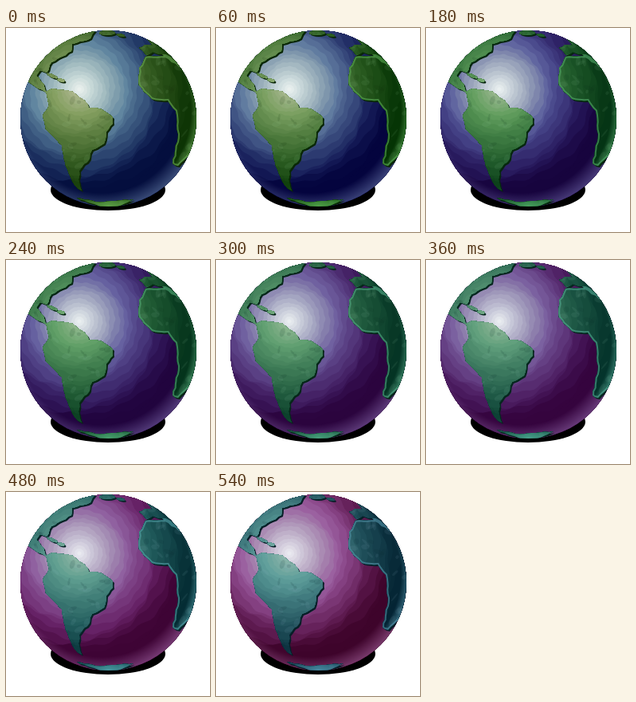
Recreate the animation shown at these times as an HTML page with a canvas. Size 256x256 px, loop 0.6 s.

```html
<!DOCTYPE html>
<html lang="en">
<head>
<meta charset="utf-8">
<title>Colour-shifting globe</title>
<style>
html, body { margin: 0; width: 100%; height: 100%; overflow: hidden; background: #fff; }
canvas { display: block; }
</style>
</head>
<body>
<canvas width="256" height="256"></canvas>
<script>
const ctx = document.querySelector('canvas').getContext('2d');
const STEP_MS = 60, STEPS = 10, HUE_STEP = 10;
const LIGHT = { x: 92, y: 77 };
const TAU = Math.PI * 2;

let seed = 7;
const random = () => (seed = seed * 16807 % 2147483647) / 2147483647;
const jitter = amount => (random() - 0.5) * amount;

const globe = new Path2D();
globe.arc(128.5, 113.5, 110.5, 0, TAU);

// Closed outline through a few key points, roughened in between
function coast(text) {
  const points = text.split(' ').map(p => p.split(',').map(Number));
  const path = new Path2D();
  points.forEach(([x, y], i) => {
    const [nx, ny] = points[(i + 1) % points.length];
    const parts = Math.max(1, Math.round(Math.hypot(nx - x, ny - y) / 5));
    for (let k = 0; k < parts; k++) {
      const rough = k ? 1.8 : 0;
      path.lineTo(x + (nx - x) * k / parts + jitter(rough), y + (ny - y) * k / parts + jitter(rough));
    }
  });
  path.closePath();
  return path;
}

function island(x, y, rx, ry, turn) {
  const path = new Path2D();
  path.ellipse(x, y, rx, ry, turn, 0, TAU);
  return path;
}

const africa = coast('175,36 200,35 218,47 245,60 245,145 216,173 209,170 216,133 213,104 203,91 183,89 167,72 167,50');
const southAmerica = coast('50,80 58,76 84,80 102,95 104,100 120,102 134,112 134,120 126,130 123,145 108,153 105,164 92,179 91,190 95,204 86,197 75,173 70,147 50,127 46,110 54,96');
const northAmerica = coast('112,3 106,13 83,20 82,29 57,43 51,56 43,53 38,60 47,70 50,81 36,73 20,62 40,20 90,0');
const europe = coast('167,25 174,21 184,22 174,11 190,10 220,44 212,45 196,33 184,30 176,34');
const antarctica = coast('89,213 112,218 138,217 160,215 130,229');

const land = new Path2D();
for (const part of [africa, southAmerica, northAmerica, europe, antarctica,
  island(58, 60, 7, 1.8, 0.4), island(69, 65.5, 4.5, 1.8, 0.2),
  island(127, 6, 10, 3, 0), island(144, 9, 5, 1.5, 0.2)]) land.addPath(part);

// Uneven rings around the light
const RINGS = 32;
const rings = Array.from({ length: RINGS }, (_, i) => {
  const radius = 190 * (1 - i / RINGS) ** 1.25;
  const path = new Path2D();
  for (let a = 0; a < TAU; a += 0.05) {
    const r = radius * (1 + 0.025 * Math.sin(3 * a + i * 1.3)
      + 0.015 * Math.sin(9 * a + i * 2.1) + 0.012 * Math.sin(23 * a + i));
    path.lineTo(LIGHT.x + r * Math.cos(a), LIGHT.y + r * Math.sin(a));
  }
  path.closePath();
  return { radius, path };
});

// Patches of relief on the land
const patches = Array.from({ length: 220 }, () => ({
  shape: island(20 + random() * 220, random() * 224, 2 + random() * 5, 1 + random() * 3, random() * 3),
  dark: random() < 0.55
}));

const hsl = (h, s, l, a = 1) => `hsl(${h} ${s}% ${l}% / ${a})`;

function ocean(distance, shift) {
  const t = Math.min(1, distance / 125);
  return hsl(150 + 80 * Math.sqrt(t) + shift, 18 + 70 * t ** 3, 13 + 80 * (1 - t) ** 1.2);
}

function ground(distance, shift) {
  const t = Math.min(1, distance / 150);
  return hsl(65 + 45 * Math.sqrt(t) + shift, 22 + 65 * t * t, 11 + 56 * (1 - t) ** 1.5);
}

function shade(colorAt, shift) {
  for (const { radius, path } of rings) {
    ctx.fillStyle = colorAt(Math.max(0, radius - 3), shift);
    ctx.fill(path);
  }
}

function glow(x, y, from, to, inner, outer) {
  const gradient = ctx.createRadialGradient(x, y, from, x, y, to);
  gradient.addColorStop(0, inner);
  gradient.addColorStop(1, outer);
  ctx.fillStyle = gradient;
  ctx.fillRect(0, 0, 256, 256);
}

function draw(step) {
  const shift = step * HUE_STEP;
  const green = (s, l, a) => hsl(105 + shift, s, l, a);
  const blue = a => hsl(215 + shift, 35, 62, a);
  ctx.clearRect(0, 0, 256, 256);
  ctx.fillStyle = '#000';
  ctx.fill(island(128, 203, 72, 26, 0));

  ctx.save();
  ctx.clip(globe);
  shade(ocean, shift);
  glow(120, 104, 103, 126, blue(0), blue(0.5));

  // Raised edge of the continents
  ctx.save();
  ctx.translate(2, 2);
  ctx.fillStyle = green(70, 9);
  ctx.fill(land);
  ctx.restore();

  ctx.save();
  ctx.clip(land);
  shade(ground, shift);
  for (const { shape, dark } of patches) {
    ctx.fillStyle = dark ? green(50, 12, 0.13) : green(30, 65, 0.09);
    ctx.fill(shape);
  }
  glow(120, 104, 112, 126, green(40, 55, 0), green(40, 55, 0.7));
  glow(128, 224, 0, 45, green(40, 52, 0.7), green(40, 52, 0));
  ctx.strokeStyle = green(34, 50, 0.6);
  ctx.lineWidth = 4;
  ctx.stroke(africa);
  ctx.restore();
  ctx.restore();
}

let shown = -1;
function tick(now) {
  const step = Math.floor(now / STEP_MS) % STEPS;
  if (step !== shown) draw(shown = step);
  requestAnimationFrame(tick);
}
draw(0);
requestAnimationFrame(tick);
</script>
</body>
</html>
```
